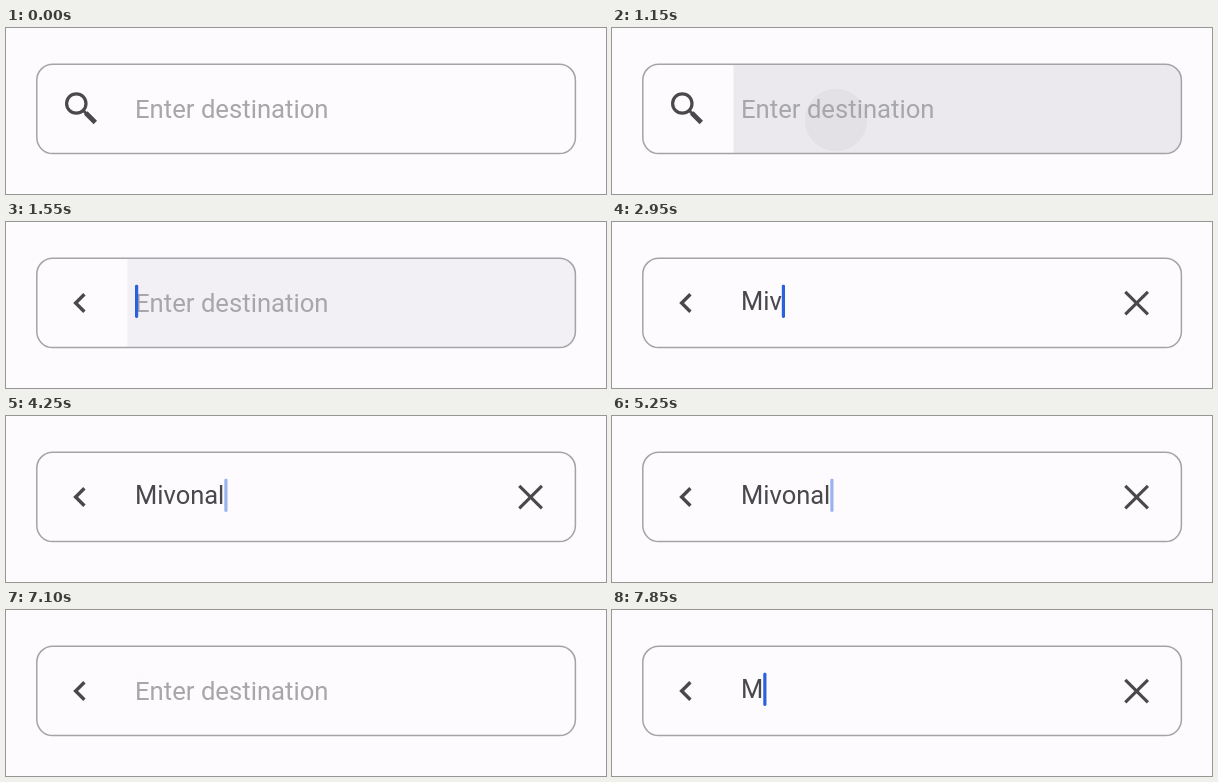
An HTML page with a canvas for the animation above (8000 ms loop, 600x166 px).

```html
<!DOCTYPE html>
<html lang="en">
<head>
<meta charset="utf-8">
<title>Search field</title>
<style>
  html, body { margin: 0; width: 100%; height: 100%; overflow: hidden; background: #fdfbfd; }
  canvas { display: block; width: 600px; height: 166px; }
</style>
</head>
<body>
<canvas id="stage" width="600" height="166"></canvas>
<script>
const ctx = document.getElementById('stage').getContext('2d');
const LOOP = 8000;
const BG = '#fdfbfd', INK = '#49484c', HINT = '#a7a6a9', CARET = '#2b62dc';
const TEXT_X = 129;
const WORD = 'Mivonal';
const KEY_TIMES = [2600, 2750, 2925, 3050, 3150, 3450, 3600];
const FOCUS = 1350, CLEAR = 5850, RETYPE = 7700;

const clamp = v => Math.max(0, Math.min(1, v));
const ramp = (t, a, b) => clamp((t - a) / (b - a));
const easeOut = p => 1 - (1 - p) * (1 - p);

function line(points, width, color = INK) {
  ctx.beginPath();
  points.forEach(([x, y]) => ctx.lineTo(x, y));
  ctx.lineWidth = width;
  ctx.strokeStyle = color;
  ctx.stroke();
}

function fade(alpha, draw) {
  if (alpha <= 0) return;
  ctx.save();
  ctx.globalAlpha = alpha;
  draw();
  ctx.restore();
}

function fieldPath() {
  ctx.beginPath();
  ctx.roundRect(30.8, 36.2, 538.6, 89.4, 16);
}

function searchIcon() {
  ctx.beginPath();
  ctx.arc(70.3, 75.5, 9.7, 0, Math.PI * 2);
  ctx.lineWidth = 3.2;
  ctx.strokeStyle = INK;
  ctx.stroke();
  line([[77, 82.2], [81, 86.2]], 3);
  line([[79.8, 85], [89.3, 94.5]], 4.8);
}

function backIcon() {
  line([[78.4, 72.2], [69.6, 81], [78.4, 89.8]], 3.4);
}

function closeIcon() {
  line([[513.3, 69.8], [535.9, 92.4]], 3.1);
  line([[535.9, 69.8], [513.3, 92.4]], 3.1);
}

function pressEffect(t) {
  if (t < 1000 || t > 1900) return;
  const tint = a => `rgba(30, 30, 60, ${a})`;
  const base = 0.08 * ramp(t, 1000, 1130) * (1 - ramp(t, 1300, 1900));
  const spot = 0.04 * ramp(t, 1030, 1120) * (1 - ramp(t, 1200, 1480));
  const radius = 30 * ramp(t, 1000, 1150) + 330 * ramp(t, 1150, 1450);
  ctx.save();
  fieldPath();
  ctx.clip();
  ctx.beginPath();
  ctx.rect(121.5, 36, 448, 90);
  ctx.clip();
  ctx.fillStyle = tint(base);
  ctx.fillRect(121, 36, 450, 91);
  ctx.fillStyle = tint(spot);
  ctx.beginPath();
  ctx.arc(224, 92, radius, 0, Math.PI * 2);
  ctx.fill();
  ctx.restore();
}

function typedText(t) {
  if (t >= RETYPE) return WORD[0];
  if (t >= CLEAR) return '';
  return WORD.slice(0, KEY_TIMES.filter(k => t >= k).length);
}

// Blink since the last edit: soft fade out, shorter fade back in.
function caretAlpha(t) {
  if (t < FOCUS) return 0;
  const edits = [1750, ...KEY_TIMES, 6050, RETYPE];
  if (t >= CLEAR && t < 6050) return 1;
  const last = edits.filter(e => t >= e).pop();
  if (!last) return ramp(t, FOCUS, FOCUS + 100);
  const age = t - last;
  if (age < 500) return 1;
  const phase = (age - 500) % 1000;
  return phase < 500 ? 1 - ramp(phase, 40, 250) : ramp(phase, 550, 680);
}

function drawText(text, size, baseline, color) {
  ctx.font = `${size}px Roboto, sans-serif`;
  ctx.fillStyle = color;
  ctx.fillText(text, TEXT_X, baseline);
  return ctx.measureText(text).width;
}

function draw(t) {
  ctx.globalAlpha = 1;
  ctx.fillStyle = BG;
  ctx.fillRect(0, 0, 600, 166);
  pressEffect(t);

  fieldPath();
  ctx.lineWidth = 1.5;
  ctx.strokeStyle = '#a5a3a7';
  ctx.stroke();

  const swap = ramp(t, FOCUS - 50, FOCUS + 100);
  fade(1 - swap, searchIcon);
  fade(swap, backIcon);

  const close = t < CLEAR
    ? ramp(t, KEY_TIMES[0] - 20, KEY_TIMES[0] + 100) * (1 - ramp(t, CLEAR - 50, CLEAR + 50))
    : Math.max(1 - ramp(t, CLEAR - 50, CLEAR + 50), ramp(t, RETYPE - 20, RETYPE + 100));
  fade(easeOut(close), closeIcon);

  const text = typedText(t);
  let width = 0;
  if (text) width = drawText(text, 25.5, 88.3, INK);
  else drawText('Enter destination', 25.7, 90, HINT);

  fade(caretAlpha(t), () => {
    ctx.fillStyle = CARET;
    ctx.beginPath();
    ctx.roundRect(TEXT_X + width, 62.7, 3.2, 33.3, 1.4);
    ctx.fill();
  });
}

const start = performance.now();
function tick() {
  draw((performance.now() - start) % LOOP);
  requestAnimationFrame(tick);
}
tick();
</script>
</body>
</html>
```
